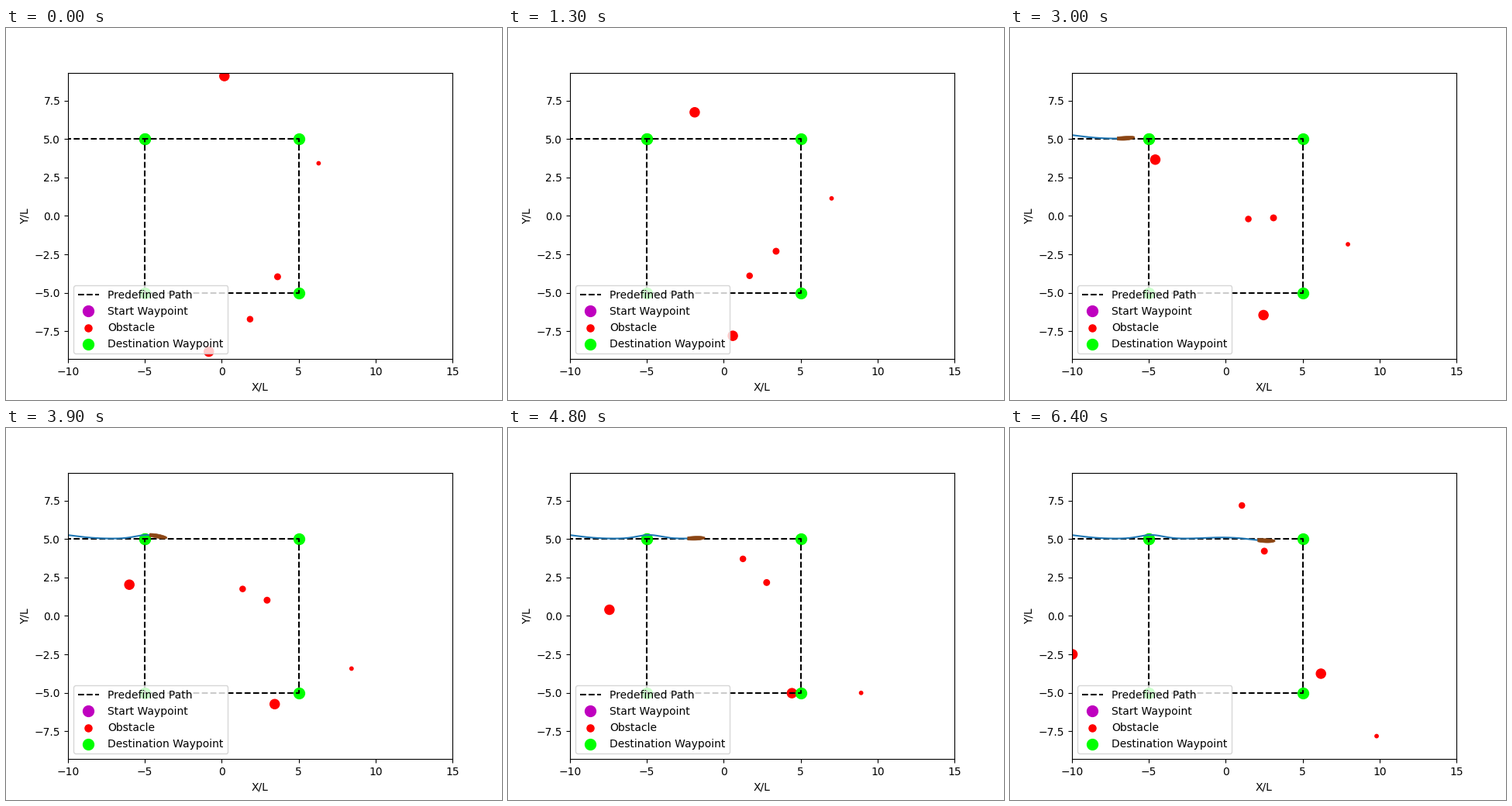
Write a matplotlib script that moves like this. It is 640x480 px and loops after 6.5 s.

```python
import numpy as np
import matplotlib.pyplot as plt
from matplotlib.animation import FuncAnimation

FRAMES, STEP = 65, 100
UNIT = 19.84   # pixels per axis unit
LENGTH = 1.12  # swimmer length in axis units

# Each obstacle drifts straight from its first to its last place
FIRST = np.array([(0.17, 9.09), (-0.84, -8.83), (3.63, -3.96), (1.84, -6.72), (6.30, 3.42)])
LAST = np.array([(-9.97, -2.50), (6.19, -3.76), (2.51, 4.21), (1.05, 7.18), (9.81, -7.82)])
AREA = [76, 76, 29, 26, 10]


def bump(x, center, width):
    return np.exp(-((x - center) / width) ** 2)


def course(x):
    """Height of the swimmer's course, weaving around the planned line."""
    weave = 0.30 * bump(x, -11, 2) + 0.24 * bump(x, -4.85, 1.1) + 0.08 * bump(x, -0.2, 1.6)
    dive = 0.15 / (1 + np.exp((1.7 - x) / 0.4))
    return 5.02 + weave - dive


def head_at(t):
    """Steady advance with a short hesitation."""
    return -14 + 2.69 * t - 0.14 * bump(t, 4.8, 1)


def body(head):
    s = np.linspace(0, 1, 25)
    x = head - LENGTH * (1 - s)
    y = course(x)
    half = (2.1 + 0.5 * np.sin(np.pi * s)) * np.sqrt(1 - 0.9 * s ** 6) / UNIT
    return np.column_stack([np.r_[x, x[::-1]], np.r_[y + half, (y - half)[::-1]]])


# Square of stops, closed back to its first corner
angles = np.radians(135 - 90 * np.arange(5))
stops = 5 * np.sqrt(2) * np.column_stack([np.cos(angles), np.sin(angles)])
start = np.array([-15, 5])

fig, ax = plt.subplots(figsize=(6.4, 4.8), dpi=100)
ax.plot(*np.vstack([start, stops]).T, "k--", label="Predefined Path")
ax.plot(*start, "mo", ms=10, label="Start Waypoint")
dots = ax.scatter(*FIRST.T, s=AREA, color="r", label="Obstacle")
ax.scatter(*stops.T, s=100, color="lime", label="Destination Waypoint")
trail, = ax.plot([], [], color="tab:blue")
swimmer, = ax.fill([0, 0, 0], [0, 0, 0], color="saddlebrown", lw=0.5, zorder=3)

ax.set_xlim(-10, 15)
ax.set_ylim(-9.3145, 9.3145)
ax.set_xlabel("X/L")
ax.set_ylabel("Y/L")
ax.legend(loc="lower left")


def draw(i):
    dots.set_offsets(FIRST + (LAST - FIRST) * i / (FRAMES - 1))
    head = head_at(i * STEP / 1000)
    x = np.linspace(start[0], head - 0.8 * LENGTH, 300)
    trail.set_data(x, course(x))
    swimmer.set_xy(body(head))
    return dots, trail, swimmer


anim = FuncAnimation(fig, draw, frames=FRAMES, interval=STEP, repeat=True, repeat_delay=0)
plt.show()
```
